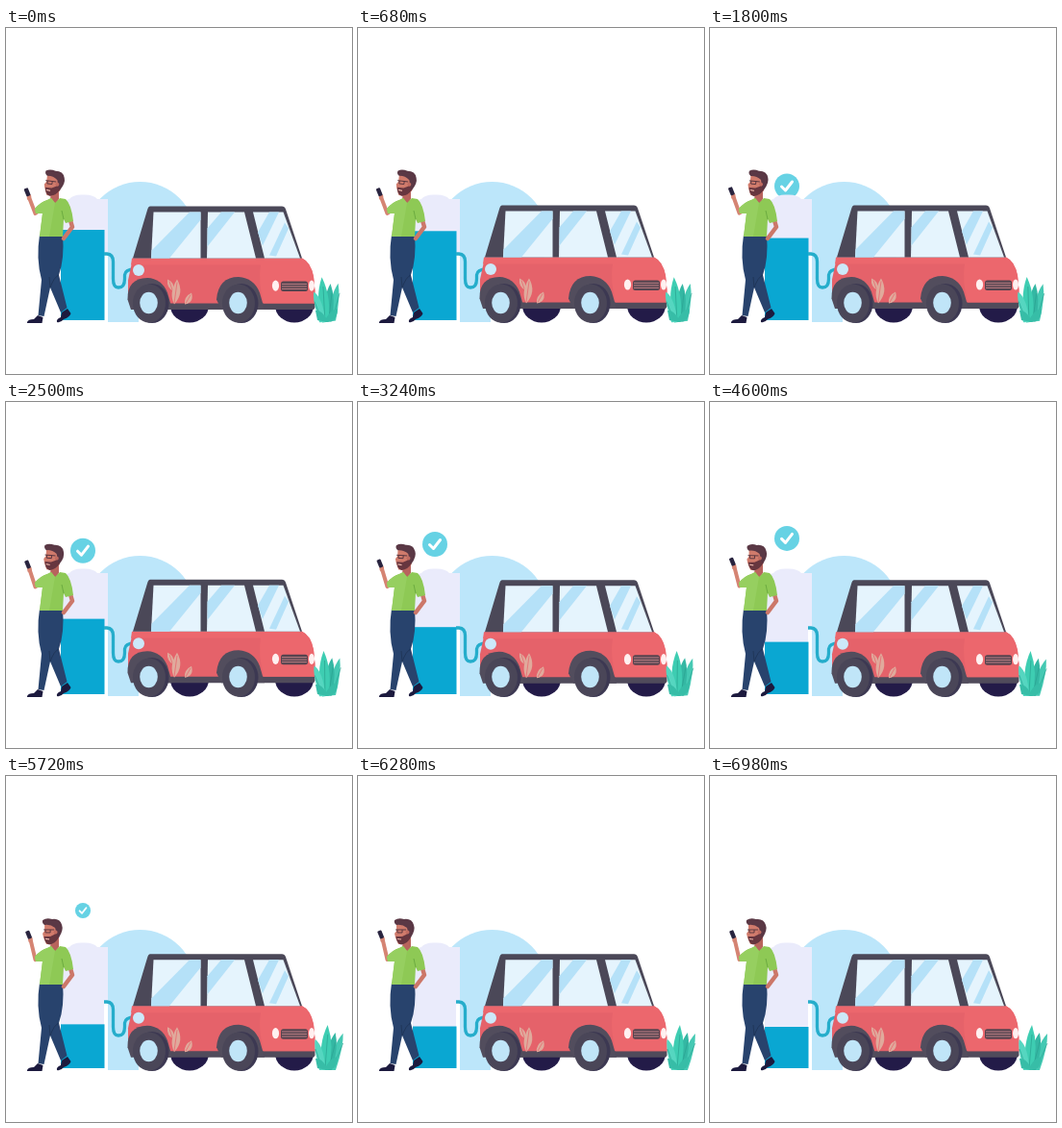
An HTML page that plays this animation: 360x360 px, repeating every 7 s.

```html
<!DOCTYPE html>
<html lang="en">
<head>
<meta charset="utf-8">
<title>Charging car</title>
<style>
html, body { margin: 0; width: 100%; height: 100%; overflow: hidden; background: #fff; }
svg { display: block; width: 100vw; height: 100vh; }
</style>
</head>
<body>
<svg viewBox="0 0 360 360">
  <g fill="#bce6fa">
    <circle cx="139.500" cy="218" r="58"/>
    <path d="M106 205H138V306H106Z"/>
  </g>

  <g id="badge">
    <circle r="13" fill="#66d2e4"/>
    <path d="M-5.500 .5L-1.500 4.500L5.500-4.500" fill="none" stroke="#fff" stroke-width="3" stroke-linecap="round" stroke-linejoin="round"/>
  </g>

  <!-- charging station -->
  <path d="M57 304V181L66 178Q70 173 80 173.500Q91 173 95 178H106V304Z" fill="#eaebfb"/>
  <path d="M102 236H106V306H102Z" fill="#fff"/>
  <rect id="level" x="57" width="45.500" fill="#0aa7d2"/>
  <path d="M102 235H105Q111.500 235.500 111.500 243V261Q111.500 270 117 270Q123.500 270 123.500 261V257Q124 251 134 251" fill="none" stroke="#25adcb" stroke-width="3.300"/>

  <!-- car -->
  <g fill="#231b48">
    <ellipse cx="191" cy="289" rx="20" ry="17.500"/>
    <ellipse cx="300" cy="289" rx="20" ry="17.500"/>
  </g>
  <g id="body">
    <path d="M150 284H321.500V290Q321 292.500 319 292.500H150Z" fill="#504b5b"/>
    <path d="M132 239L127 262V280L134 286H321.500Q322 272 320 258Q317 243 308 239Z" fill="#e5626a"/>
    <path d="M131 239H308Q317 243 320 258Q322 272 321.500 286H268Q262 262 265 246H130Z" fill="#ec676d"/>
    <path d="M150 185H287Q290 185 291 188L308 239H132L147 189Q148 185 150 185Z" fill="#4b4858"/>
    <g fill="#e5f4fd">
      <path d="M153.500 191H202.500V239H151Z"/>
      <path d="M210 191H248L260 239H209Z"/>
      <path d="M257 191H288.500L306 239H269Z"/>
    </g>
    <g fill="#b5e1f8">
      <path d="M191 191H202.500V199L170 239H151L151.500 231Z"/>
      <path d="M224 191H238L209.500 227V208Z"/>
      <path d="M262 212L274 191H284L267 226Z"/>
      <path d="M274 236L290 202L294 208L281 237Z"/>
    </g>
    <path d="M126.500 282Q126 260 147 259.500Q162 260 168 275L173 292.500H130Z" fill="#524d5d"/>
    <path d="M219 282Q221 258.500 242 258.500Q258 259.500 264 275L269 292.500H224Z" fill="#524d5d"/>
    <circle cx="138" cy="251.500" r="6" fill="#cce9f9"/>
    <ellipse cx="280.500" cy="267.500" rx="3.600" ry="5.600" fill="#fff0f0"/>
    <ellipse cx="318" cy="267.500" rx="3" ry="5.600" fill="#fff0f0"/>
    <rect x="286" y="263" width="28" height="10.500" rx="2.500" fill="#55444f"/>
    <path d="M287 265.800H313M287 268.300H313M287 270.800H313" stroke="#d98f92" stroke-width=".8"/>
    <g fill="#e0aa9c">
      <path d="M168 261Q176 264 174 273Q167 270 168 261Z"/>
      <path d="M178 261Q186 275 175 287Q169 275 178 261Z"/>
      <path d="M193 275Q196 285 186 287Q185 279 193 275Z"/>
    </g>
    <path d="M170 263L173 272M178 264L175 286M192 277L187 286" stroke="#e8626a" stroke-width=".7"/>
  </g>
  <g id="wheels"></g>

  <g id="plant"></g>

  <!-- man -->
  <path d="M35 215H59Q61 240 55 257L63.500 291L57 296L46 270L39.500 300L33.500 299L37 262Q31 240 35 215Z" fill="#28436d"/>
  <path d="M55 257Q50 259 46 270L45 259" fill="none" stroke="#203659" stroke-width="1"/>
  <g fill="#1c1a3e">
    <path d="M22 306Q23 303 29 303L33 299L38.500 301L37.500 307H22Z"/>
    <path d="M53 306Q52 303 57 301L58 296L64 292L67.500 297Q66 301 60 303Q57 307 53 306Z"/>
  </g>
  <path d="M67 200L69 207L60 219" fill="none" stroke="#cc7769" stroke-width="4.500" stroke-linejoin="round" stroke-linecap="round"/>
  <path id="arm" fill="none" stroke="#d58473" stroke-width="4" stroke-linejoin="round" stroke-linecap="round"/>
  <g id="phone">
    <ellipse cx="1.500" cy="4.500" rx="2.300" ry="3.200" fill="#d58473"/>
    <rect x="-2.300" y="-5" width="4.400" height="8.500" rx="1" fill="#29243f" transform="rotate(-22)"/>
  </g>
  <path d="M47 168H55V178L51 184L46 179Z" fill="#b8645d"/>
  <path d="M43 179L47 177L51 182L56 177L62 178Q68 183 70 201L62 203L60 199L59 217H35L38 193L31 193L30 188Q36 181 43 179Z" fill="#8ec955"/>
  <path d="M43 179L47 177L51 182L45 217H35L38 193L31 193L30 188Q36 181 43 179Z" fill="#96cf60"/>
  <path d="M60 199L58 190" stroke="#6cab40" stroke-width="1"/>
  <g id="head">
    <path d="M40 154H55V169L48 175H42L39 168L38 164L40 161Z" fill="#d07b6c"/>
    <path d="M39.500 167L46 167L50 165L55 161V168Q51 175 45 175.500Q40 174 39.500 167Z" fill="#67363f"/>
    <path d="M41 169.500L45 170" stroke="#e9b3a8" stroke-width="1.200"/>
    <path d="M38 150Q42 147 48 149Q56 148 58 155Q60 160 55 168L53 166L51 158Q46 154 40 155Q37 153 38 150Z" fill="#5a3845"/>
    <circle cx="51.500" cy="162.500" r="2" fill="#c16c61"/>
    <path d="M39 160H50M41 160V163H46V160" fill="none" stroke="#51313c" stroke-width=".9"/>
  </g>
</svg>
<script>
const LOOP = 7000;
const el = id => document.getElementById(id);
const move = (id, value) => el(id).setAttribute('transform', value);
const ease = p => (1 - Math.cos(Math.PI * Math.min(1, Math.max(0, p)))) / 2;

// Linear interpolation through [time, value] pairs
function track(t, keys) {
  const i = keys.findIndex(k => k[0] > t);
  if (i < 0) return keys[keys.length - 1][1];
  if (!i) return keys[0][1];
  const [a, u] = keys[i - 1], [b, v] = keys[i];
  return u + (v - u) * (t - a) / (b - a);
}

el('wheels').innerHTML = [149, 242].map(x => `
  <ellipse cx="${x + 3}" cy="286.500" rx="17.500" ry="20.500" fill="#3c3852"/>
  <ellipse cx="${x}" cy="286.500" rx="17" ry="20" fill="#4a4658"/>
  <ellipse cx="${x - .5}" cy="286" rx="9.300" ry="11.300" fill="#c0e5f8"/>`).join('');

// Each leaf: base x, tip x, tip y, bulge, colour, sway in degrees
const leaves = [
  [340, 351, 268, 6, '#45c9b3', 8],
  [336, 343, 267, 7, '#34b7a3', 8],
  [332, 335, 259, 9, '#3ecdb2', 8],
  [329, 322, 274, 6, '#55d6c0', 3]
];
el('plant').innerHTML = leaves.map(([x, tx, ty, w, color]) => `
  <g><path d="M${x - 3} 306Q${(x + tx) / 2 - w} 280 ${tx} ${ty}Q${(x + tx) / 2 + w} 282 ${x + 3} 306Z" fill="${color}"/>
  <path d="M${x} 304L${tx} ${ty + 10}" stroke="#2aa391" stroke-width=".7"/></g>`).join('') +
  '<path d="M322 294Q328 293 333 302Q338 293 345 292Q345 300 341 304L334 306L324 304Z" fill="#37bda7"/>';
const leafNodes = [...el('plant').querySelectorAll('g')];

function draw(t) {
  const p = ease(t / 6700);

  const y = 210 + 51 * p;
  el('level').setAttribute('y', y);
  el('level').setAttribute('height', 304 - y);

  const rise = track(t, [[0, 195], [700, 188], [1240, 177], [1800, 164.5], [2240, 157.5],
    [2800, 151.5], [3300, 147.5], [3900, 144.3], [4540, 142], [5700, 140]]);
  const size = track(t, [[5500, 1], [6080, 0]]);
  move('badge', `translate(80 ${rise}) scale(${size})`);

  move('body', `translate(0 ${track(t, [[0, .6], [680, -.5], [1800, -.5], [3240, .2]])})`);
  move('head', `rotate(${7 * (1 - p)} 51 178)`);

  const hx = 22.5 + 1.5 * p, hy = 171.5 - 6 * p;
  move('phone', `translate(${hx} ${hy})`);
  el('arm').setAttribute('d', `M36 189L30.500 ${193 - 2 * p}L${hx + 2} ${hy + 6}`);

  leafNodes.forEach((node, i) =>
    node.setAttribute('transform', `rotate(${leaves[i][5] * (p - 1)} 333 305)`));
}

const start = performance.now();
(function frame() {
  draw((performance.now() - start) % LOOP);
  requestAnimationFrame(frame);
})();
</script>
</body>
</html>
```
